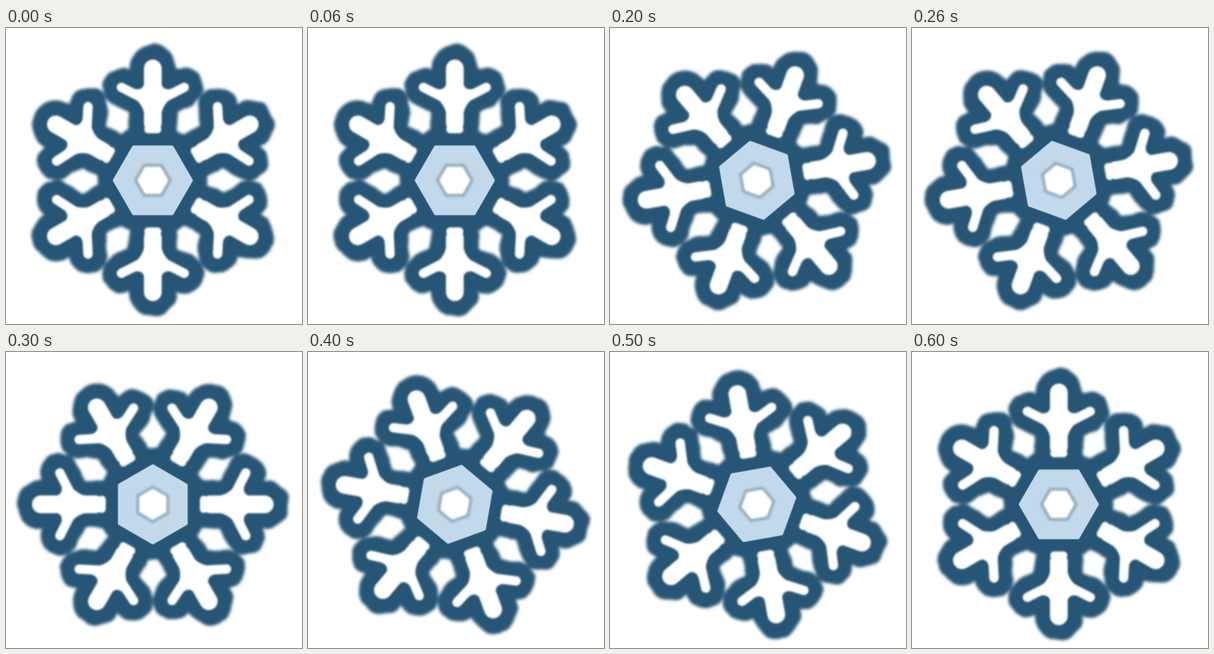
These frames come from a looping animation (500x500 px, 0.7 s). An HTML page:

```html
<!DOCTYPE html>
<html lang="en">
<head>
<meta charset="utf-8">
<title>Snowflake</title>
<style>
  html, body { margin: 0; width: 100%; height: 100%; overflow: hidden; background: #fff; }
  svg { display: block; width: 100%; height: 100%; }
</style>
</head>
<body>
<svg viewBox="0 0 500 500">
  <defs>
    <filter id="ragged" filterUnits="userSpaceOnUse" x="-250" y="-250" width="500" height="500" color-interpolation-filters="sRGB">
      <feTurbulence type="fractalNoise" baseFrequency="0.04" numOctaves="1" seed="4"/>
      <feDisplacementMap in="SourceGraphic" scale="11" xChannelSelector="R" yChannelSelector="G"/>
      <feGaussianBlur stdDeviation="2.8"/>
    </filter>
    <filter id="soft" filterUnits="userSpaceOnUse" x="-250" y="-250" width="500" height="500" color-interpolation-filters="sRGB">
      <feGaussianBlur stdDeviation="1.7"/>
    </filter>
    <g id="branch">
      <path d="M53 -157L8 -134" stroke-width="16"/>
      <path d="M40 -144Q16 -132 14 -108H0V-164H14Q18 -148 38 -157Z" fill="#fff" stroke="none"/>
    </g>
    <g id="arm">
      <path d="M0 -189V-97" stroke-width="30"/>
      <path d="M-8 -86H8" stroke-width="13"/>
      <use href="#branch"/>
      <use href="#branch" transform="scale(-1 1)"/>
    </g>
    <g id="shell">
      <path d="M0 -189V-60" stroke-width="81"/>
      <path d="M-53 -157L0 -130L53 -157" stroke-width="65"/>
    </g>
  </defs>
  <g id="flake" stroke-linecap="round" stroke-linejoin="round">
    <g fill="none" stroke="#265575" filter="url(#ragged)">
      <circle r="94" fill="#265575" stroke="none"/>
      <g class="sixfold" data-part="shell"></g>
    </g>
    <g class="sixfold" data-part="arm" fill="none" stroke="#fff" filter="url(#soft)"></g>
    <path class="hex" data-r="67" fill="#7f9fb6" filter="url(#soft)"/>
    <path class="hex" data-r="65" fill="#c1d9eb" stroke="#c1d9eb" stroke-width="5"/>
    <path class="hex" data-r="28" fill="#9db2c2" stroke="#9db2c2" stroke-width="8" filter="url(#soft)"/>
    <path class="hex" data-r="21" fill="#fff" stroke="#fff" stroke-width="9" filter="url(#soft)"/>
  </g>
</svg>
<script>
const STEP_MS = 100, STEPS = 7, STEP_DEG = 10;
const sixth = [0, 1, 2, 3, 4, 5];

function hexPath(radius) {
  const corner = i => [Math.cos, Math.sin].map(f => (radius * f(i * Math.PI / 3)).toFixed(2));
  return `M${sixth.map(corner).join("L")}Z`;
}

document.querySelectorAll(".hex").forEach(el => el.setAttribute("d", hexPath(+el.dataset.r)));
document.querySelectorAll(".sixfold").forEach(el => {
  el.innerHTML = sixth.map(i => `<use href="#${el.dataset.part}" transform="rotate(${i * 60})"/>`).join("");
});

// Stepped turn of a sixth; the last step is back in the starting pose.
const flake = document.getElementById("flake");
function render(time) {
  const step = Math.floor(time / STEP_MS) % STEPS;
  flake.setAttribute("transform", `translate(248 257.3) rotate(${step * STEP_DEG % 60})`);
}

const start = performance.now();
function tick() {
  render(performance.now() - start);
  requestAnimationFrame(tick);
}
tick();
</script>
</body>
</html>
```
